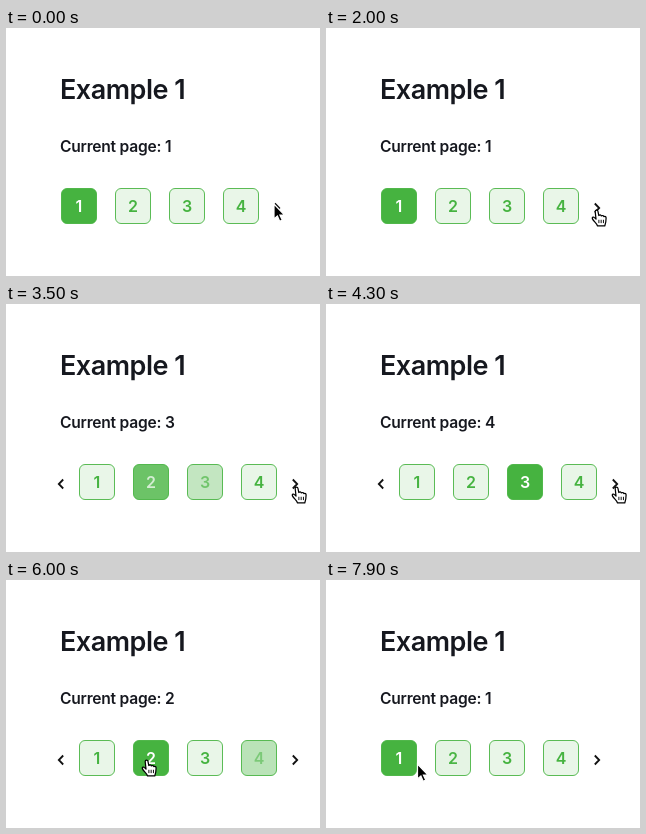
An HTML page for the animation above (8000 ms loop, 314 px wide and 248 px high).

```html
<!DOCTYPE html>
<html lang="en">
<head>
<meta charset="utf-8">
<title>Pagination example</title>
<style>
  html, body { margin: 0; width: 100%; height: 100%; overflow: hidden; background: #fff; }
  svg { display: block; width: 100vw; height: 100vh; }
  text { font: 600 16px Inter, sans-serif; fill: #16181f; }
  .title { font-size: 27px; letter-spacing: -0.018em; }
  .label { font-size: 15.6px; letter-spacing: -0.015em; }
  .button text { text-anchor: middle; }
  .button rect { stroke: #46b340; stroke-opacity: 0.88; }
  .chevron { fill: none; stroke: #111; stroke-width: 1.8; }
  .arrow { fill: #000; stroke: #fff; stroke-width: 1.2; }
  .hand { fill: #fff; stroke: #000; stroke-width: 1.3; stroke-linejoin: round; }
</style>
</head>
<body>
<svg viewBox="0 0 314 248">
  <text class="title" x="54" y="71">Example 1</text>
  <text class="label" x="54" y="124">Current page: <tspan id="page">1</tspan></text>
  <path id="previous" class="chevron" d="M57.2 175.5L52.8 180L57.2 184.5"/>
  <g id="row">
    <path class="chevron" d="M268.8 175.5L273.2 180L268.8 184.5"/>
  </g>
  <g id="cursor">
    <path id="arrow" class="arrow" d="M-1 -1V14L2.4 10.9L4.7 16.2L7.2 15.1L4.9 10H9.5Z"/>
    <g id="hand" class="hand" transform="translate(.6 .8) scale(.95)">
      <path d="M-1.5 1.8C-1.5 0 1.2 0 1.5 1.8L2.3 6Q4 4.5 5 6.4Q7 5.3 7.6 7.2Q10 6.5 10 8.6Q10 13 8.6 17H1C0 14-3 12.5-4.5 9.3C-5 7.8-3.3 7-2.2 8.2L-.6 9.8Z"/>
      <path d="M2.4 10.5v3.5m2.4-3.5v3.5m2.4-3.5v3.5" stroke-width="1"/>
    </g>
  </g>
</svg>
<script>
const LOOP = 8000, FADE = 500, STEP = 5;
const COUNT = 4, LEFT = 55, TOP = 160, SIZE = 36, PITCH = 54, SHIFT = 18;
const GREEN = [70, 179, 64], PALE = [233, 246, 232], WHITE = [255, 255, 255];

// The cursor's visits; everything else follows from what it hovers and clicks
const home = { x: 269, y: 177 };
const moves = [
  { start: 100, end: 500, x: 270, y: 181 },
  { start: 2500, end: 3000, x: 290, y: 182 },
  { start: 4450, end: 4850, x: 289, y: 191.5 },
  { start: 5000, end: 5250, x: 215, y: 215 },
  { start: 5250, end: 5500, x: 140, y: 179 },
  { start: 6340, end: 6700, x: 92.5, y: 185 },
];
const clicks = [2300, 3415, 4300, 5790, 7500];

const $ = id => document.getElementById(id);
const lerp = (a, b, k) => a + (b - a) * k;
const clamp = k => Math.min(1, Math.max(0, k));
const smooth = k => k * k * (3 - 2 * k);
const mix = (a, b, k) => `rgb(${a.map((c, i) => Math.round(lerp(c, b[i], k)))})`;
const latest = (events, t) => events.findLast(event => event.start <= t);
const shiftFor = page => page > 1 ? SHIFT : 0;

// CSS "ease" timing curve
function ease(x) {
  if (x >= 1) return 1;
  let low = 0, high = 1, u;
  for (let i = 0; i < 20; i++) {
    u = (low + high) / 2;
    if (0.75 * u * (1 - u) + u ** 3 < x) low = u; else high = u;
  }
  return 0.3 * u * (1 - u) ** 2 + 3 * u * u * (1 - u) + u ** 3;
}

function cursorAt(t) {
  return moves.reduce((at, { start, end, x, y }) => {
    const k = smooth(clamp((t - start) / (end - start)));
    return { x: lerp(at.x, x, k), y: lerp(at.y, y, k) };
  }, home);
}

// Number of the button under a point, or 0
function buttonAt({ x, y }, page) {
  const offset = x - LEFT - shiftFor(page);
  const inside = offset >= 0 && offset < COUNT * PITCH && offset % PITCH < SIZE
    && y >= TOP && y < TOP + SIZE;
  return inside ? Math.floor(offset / PITCH) + 1 : 0;
}

function isOnNext({ x, y }, page) {
  return Math.abs(x - shiftFor(page) - 271) < 6 && y > TOP + SIZE / 2 && y < TOP + SIZE;
}

const buttons = Array.from({ length: COUNT }, (_, i) => {
  const lit = i === 0 ? 1 : 0;
  return { number: i + 1, fades: [{ start: -FADE, from: lit, goal: lit }] };
});
const pages = [{ start: 0, page: 1 }];

function litAmount({ fades }, t) {
  const { start, from, goal } = latest(fades, t);
  return lerp(from, goal, ease((t - start) / FADE));
}

// Play one loop in advance, noting page changes and where fades begin
function rehearse() {
  let page = 1;
  for (let t = 0; t < LOOP; t += STEP) {
    const at = cursorAt(t);
    if (clicks.includes(t)) {
      page = buttonAt(at, page) || (isOnNext(at, page) ? Math.min(page + 1, COUNT) : page);
      pages.push({ start: t, page });
    }
    const hovered = buttonAt(at, page);
    for (const button of buttons) {
      const goal = button.number === page || button.number === hovered ? 1 : 0;
      if (goal !== button.fades.at(-1).goal) {
        button.fades.push({ start: t, from: litAmount(button, t), goal });
      }
    }
  }
}

function add(parent, tag, attributes) {
  const node = document.createElementNS('http://www.w3.org/2000/svg', tag);
  for (const name in attributes) node.setAttribute(name, attributes[name]);
  return parent.appendChild(node);
}

function build(button, i) {
  const x = LEFT + i * PITCH;
  const group = add($('row'), 'g', { class: 'button' });
  button.box = add(group, 'rect',
    { x: x + 0.5, y: TOP + 0.5, width: SIZE - 1, height: SIZE - 1, rx: 5.5 });
  button.label = add(group, 'text', { x: x + SIZE / 2, y: TOP + 24 });
  button.label.textContent = button.number;
}

function draw(t) {
  const { page } = latest(pages, t);
  $('page').textContent = page;
  $('previous').style.display = page > 1 ? '' : 'none';
  $('row').setAttribute('transform', `translate(${shiftFor(page)})`);

  for (const button of buttons) {
    const amount = litAmount(button, t);
    button.box.style.fill = mix(PALE, GREEN, amount);
    button.label.style.fill = mix(GREEN, WHITE, amount);
  }

  const at = cursorAt(t);
  const clickable = buttonAt(at, page) || isOnNext(at, page);
  $('hand').style.display = clickable ? '' : 'none';
  $('arrow').style.display = clickable ? 'none' : '';
  $('cursor').setAttribute('transform', `translate(${at.x} ${at.y})`);
}

rehearse();
buttons.forEach(build);
const began = performance.now();
function tick() {
  draw((performance.now() - began) % LOOP);
  requestAnimationFrame(tick);
}
tick();
</script>
</body>
</html>
```
